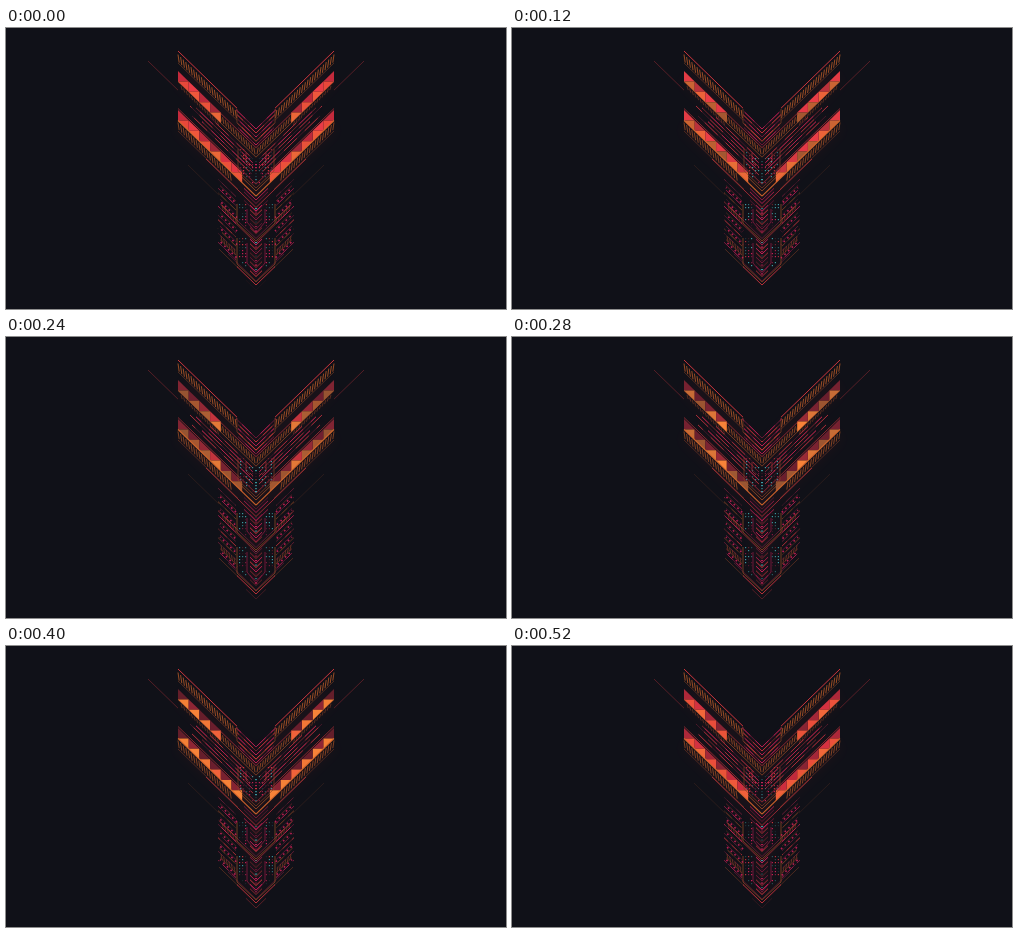
An HTML page for the animation above (560 ms loop, 500 px wide and 281 px high).

```html
<!DOCTYPE html>
<html lang="en">
<head>
<meta charset="utf-8">
<title>Neon chevrons</title>
<style>
html, body { margin: 0; width: 100%; height: 100%; overflow: hidden; background: #101118; }
svg { display: block; width: 100vw; height: 100vh; }
</style>
</head>
<body>
<svg viewBox="0 0 500 281" preserveAspectRatio="none">
  <rect width="500" height="281" fill="#101118"/>
  <filter id="soft" x="-50%" y="-50%" width="200%" height="200%">
    <feGaussianBlur stdDeviation="6"/>
  </filter>
  <path d="M176 48L250 120L324 48M176 96L250 168L324 96M250 150V245" fill="none"
        stroke="#c02838" stroke-width="18" opacity="0.06" filter="url(#soft)"/>
  <g id="half" fill="none"></g>
  <use href="#half" transform="matrix(-1 0 0 1 500 0)"/>
</svg>
<script>
const NS = 'http://www.w3.org/2000/svg';
const half = document.getElementById('half');
const LOOP = 560, STEP = 40, SLOPE = 0.97, MID = 250, EDGE = 172;
const RED = '#d5373f', ORANGE = '#dc6a2c', BROWN = '#8d4526',
      PINK = '#d0215a', WINE = '#74203a', TEAL = '#3fa3aa';
const updates = [];

let seed = 17;
function rnd() {
  seed = (seed * 16807) % 2147483647;
  return seed / 2147483647;
}

function add(tag, attrs) {
  const node = document.createElementNS(NS, tag);
  for (const key in attrs) node.setAttribute(key, attrs[key]);
  half.appendChild(node);
  return node;
}

// Height at x of the slanted line that meets the axis at tip
const at = (x, tip) => tip - (MID - x) * SLOPE;
// Tip of the slanted line that leaves the wing edge at y
const tipOf = y => y + (MID - EDGE) * SLOPE;
const wave = phase => 0.5 + 0.5 * Math.cos(phase * Math.PI * 2);

function slant(x0, x1, tip, color, width = 0.8, opacity = 1) {
  return add('path', {
    d: `M${x0} ${at(x0, tip)}L${x1} ${at(x1, tip)}`,
    stroke: color, 'stroke-width': width, opacity
  });
}

// Dashes travel toward the axis, one period per loop
function flow(x0, x1, tip, color, on, off, opacity = 0.8, width = 0.9) {
  const node = slant(x0, x1, tip, color, width, opacity);
  const start = rnd() * (on + off);
  node.setAttribute('stroke-dasharray', `${on} ${off}`);
  updates.push(p => node.setAttribute('stroke-dashoffset', start - p * (on + off)));
}

function hatch(x0, x1, top, bottom, color, opacity) {
  let d = '';
  for (let x = x0; x < x1; x += 2.6) {
    d += `M${x} ${at(x, top)}L${x + 1.2} ${at(x + 1.2, bottom)}`;
  }
  add('path', { d, stroke: color, 'stroke-width': 0.9, opacity });
}

function poly(points, color, width, opacity) {
  return add('path', { d: 'M' + points.join('L'), stroke: color, 'stroke-width': width, opacity });
}

function pulse(node, phase, low, high) {
  updates.push(p => node.setAttribute('opacity', low + (high - low) * wave(p - phase)));
}

// Colours around one loop for the two triangles of a cell
const UPPER = [
  [196, 42, 60], [240, 62, 72], [214, 56, 64], [128, 36, 50],
  [108, 30, 46], [100, 30, 42], [150, 38, 54]
];
const LOWER = [
  [232, 72, 58], [236, 112, 56], [168, 88, 48], [150, 84, 50],
  [248, 132, 58], [244, 128, 54], [240, 90, 60]
];
function tint(ramp, phase) {
  const n = ramp.length, f = ((phase % 1) + 1) % 1 * n, i = Math.floor(f), k = f - i;
  const a = ramp[i], b = ramp[(i + 1) % n];
  return `rgb(${a.map((v, j) => Math.round(v + (b[j] - v) * k))})`;
}

function triangles(top, count) {
  const w = 10.7, h = w * SLOPE;
  for (let k = 0; k < count; k++) {
    const x = EDGE + k * w, y = at(x, top);
    const upper = add('path', { d: `M${x} ${y}v${h}h${w}z` });
    const lower = add('path', { d: `M${x} ${y + h}h${w}v${h}z` });
    const lag = 0.12 * Math.sin(k * 1.7);
    updates.push(p => {
      upper.setAttribute('fill', tint(UPPER, p + lag));
      lower.setAttribute('fill', tint(LOWER, p - lag));
    });
  }
}

function dots(x0, x1, y0, y1, top, bottom, gap) {
  for (let y = y0; y < y1; y += gap) {
    for (let x = x0; x < x1; x += gap) {
      if (y < at(x, top) || y > at(x, bottom) || rnd() < 0.2) continue;
      const kind = rnd();
      const color = kind < 0.5 ? TEAL : kind < 0.8 ? PINK : RED;
      const node = add('rect', { x, y, width: 1.2, height: 1.2, fill: color });
      const phase = (color === TEAL ? 0.42 : 0.95) + (rnd() - 0.5) * 0.45;
      pulse(node, phase, 0.12, 0.95);
    }
  }
}

// Long hairlines
slant(142, EDGE, 137.8, RED, 0.7, 0.5);
slant(182, 213, 203, BROWN, 0.6, 0.35);

// Upper wing
slant(EDGE, 231, tipOf(23), RED, 1, 0.95);
hatch(EDGE, 230, tipOf(26.5), tipOf(33.5), ORANGE, 0.75);
slant(EDGE, 231, tipOf(35), BROWN, 0.6, 0.85);
poly([[231, 81], [231, 95], [250, 113.5]], BROWN, 0.8, 0.8);

// Middle wing
triangles(tipOf(43), 4);
slant(EDGE, 250, tipOf(53.5), ORANGE, 0.8, 0.6);
hatch(EDGE + 3, 213, tipOf(55), tipOf(58), BROWN, 0.6);
hatch(214, 248, tipOf(46), tipOf(51.5), ORANGE, 0.6);
slant(214, 250, tipOf(44), RED, 0.8, 0.75);

for (let i = 0; i < 5; i++) {
  const tip = 101 + i * 4, color = i % 2 ? RED : PINK;
  slant(232, 250, tip, color, 0.9, 0.5);
  flow(230 + i, 250, tip, color, 13, 7, 0.85);
}

[204, 190, 184, 196, 186].forEach((x, i) => {
  const tip = 134 + i * 4;
  slant(x, 246, tip, i % 2 ? RED : WINE, 0.8, 0.6);
  flow(x, 247, tip, i % 2 ? PINK : RED, 18, 11, 0.8);
});

// Large lower wing
triangles(tipOf(82), 6);
slant(EDGE, 250, tipOf(80.5), RED, 0.8, 0.75);
slant(EDGE, 250, tipOf(92.5), ORANGE, 1.1, 0.9);
hatch(EDGE, 224, tipOf(94.5), tipOf(101), ORANGE, 0.6);
slant(EDGE, 232, tipOf(103), BROWN, 0.6, 0.8);
slant(236, 250, 163, ORANGE, 0.8, 0.7);

// Heart of the figure
poly([[232, 121], [232, 143], [250, 160]], BROWN, 0.8, 0.8);
poly([[240, 125], [240, 134], [244, 138]], RED, 0.8, 0.7);
dots(234, 250, 121, 156, 132, 160, 3);

// Spine
[172, 175.5, 184].forEach((tip, i) =>
  pulse(slant(238, 250, tip, PINK, 0.9), i * 0.3, 0.3, 0.9));
slant(200, 250, 179.5, RED, 0.9, 0.75);
slant(216, 250, 215, RED, 0.9, 0.65);
slant(214, 250, 210.5, WINE, 0.8, 0.9);
slant(213, 232, 257, BROWN, 0.8, 0.6);
slant(231, 250, 257, RED, 1, 0.85);
slant(222, 250, 253, WINE, 0.8, 0.8);
pulse(slant(240, 250, 262, RED, 0.8), 0.64, 0, 0.5);

function segment(top, knee, tip) {
  poly([[231, top], [231, knee], [250, tip]], ORANGE, 0.8, 0.6);
  poly([[241, top + 5], [241, knee - 1], [250, tip - 8]], PINK, 0.8, 0.6);
  dots(233, 240, top, knee + 6, tip - 42, tip - 4, 3);
  for (let y = top + 4, i = 0; y < tip - 6; y += 4.5, i++) {
    pulse(slant(244, 250, y + 3, i % 2 ? RED : PINK, 1), i / 7, 0.35, 0.95);
    const dot = add('rect', { x: 248.8, y, width: 1.2, height: 1.2, fill: i % 3 ? PINK : TEAL });
    pulse(dot, i / 5, 0.1, 0.9);
  }
}
segment(176, 195, 213);
segment(210, 236, 254);

// Small side feathers, some of them rows of moving dots
for (let tip = 188, i = 0; tip < 252; tip += 4.5, i++) {
  const color = [WINE, RED, PINK, BROWN][i % 4];
  slant(212 + i % 3 * 2, 230, tip, color, 0.8, 0.45);
  if (i % 3 === 1) flow(214, 231, tip + 2, PINK, 1.7, 3.4, 0.85, 1.6);
  else flow(212, 230, tip, color, 8, 5, 0.65);
}
hatch(216, 229, 210, 214, BROWN, 0.6);
hatch(215, 230, 242, 247, BROWN, 0.7);

let origin = null;
function frame(now) {
  if (origin === null) origin = now;
  const p = Math.floor(((now - origin) % LOOP) / STEP) * STEP / LOOP;
  updates.forEach(update => update(p));
  requestAnimationFrame(frame);
}
requestAnimationFrame(frame);
</script>
</body>
</html>
```
